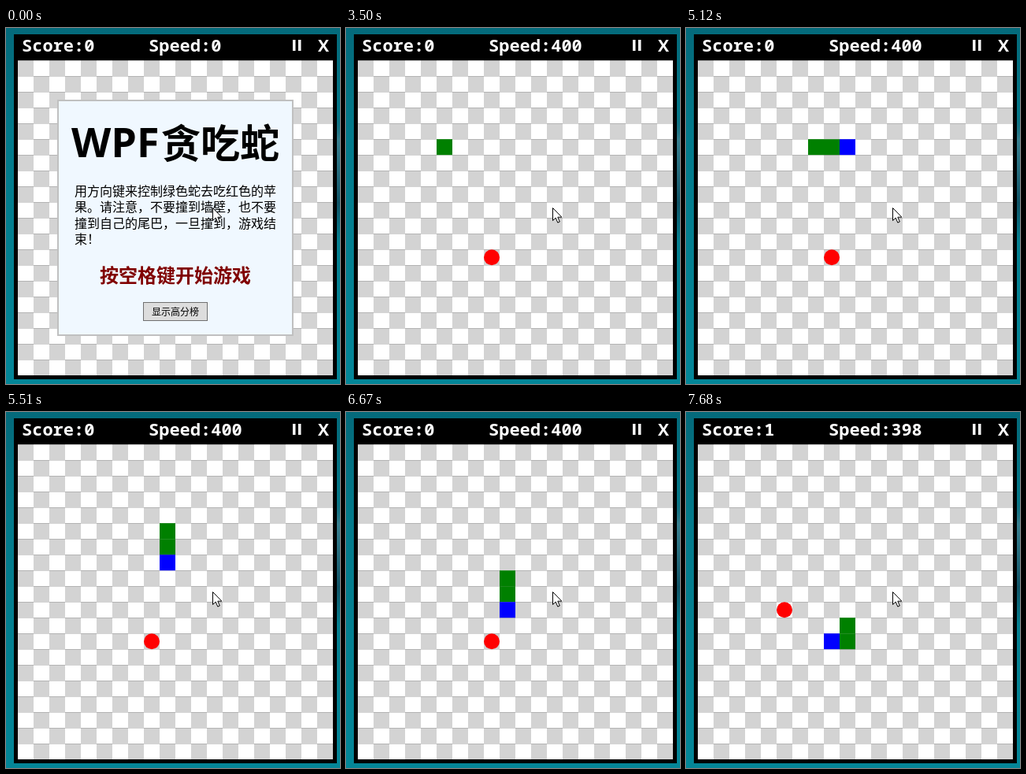
Write an HTML page with a canvas that moves like this. It is 424 by 452 pixels and loops after 8 s.

```html
<!DOCTYPE html>
<html lang="zh-CN">
<head>
<meta charset="utf-8">
<title>贪吃蛇</title>
<style>
html, body { margin: 0; width: 424px; height: 452px; overflow: hidden; }
canvas { display: block; }
</style>
</head>
<body>
<canvas id="stage" width="424" height="452"></canvas>
<script>
const ctx = document.getElementById('stage').getContext('2d');
const LOOP = 8000, CELL = 20, LEFT = 15, TOP = 41.2;
const SCORES_AT = 500, GAME_AT = 3500, EAT_AT = 7680;
const CJK = '"Noto Sans CJK SC", "Noto Sans CJK", sans-serif';
const LATIN = '"Open Sans", "Noto Sans", ' + CJK;
const MONO = '"Noto Sans Mono", "DejaVu Sans Mono", monospace';

const moveTimes = [3500, 3880, 4280, 4660, 5120, 5200, 5510, 5890, 6290, 6670, 7130, 7530, 7680];
const path = moveTimes.map((_, i) => i < 5 ? [5 + i, 5] : i < 12 ? [9, i + 1] : [8, 12]);

const intro = [
  '用方向键来控制绿色蛇去吃红色的苹',
  '果。请注意，不要撞到墙壁，也不要',
  '撞到自己的尾巴，一旦撞到，游戏结',
  '束！'
];
const scores = [['柳禾舟', 123], ['练习7', 80], ['摘果', 12], ['摘果', 11], ['好好好', 10]];

function rect(x, y, w, h, color) {
  ctx.fillStyle = color;
  ctx.fillRect(x, y, w, h);
}

function text(str, x, y, font, color = '#000', align = 'left') {
  ctx.font = font;
  ctx.fillStyle = color;
  ctx.textAlign = align;
  ctx.fillText(str, x, y);
}

function cell([col, row], color) {
  rect(LEFT + col * CELL, TOP + row * CELL, CELL, CELL, color);
}

function drawWater() {
  const g = ctx.createLinearGradient(0, 0, 0, 452);
  g.addColorStop(0, '#046a7b');
  g.addColorStop(0.3, '#047a8b');
  g.addColorStop(0.6, '#047f90');
  g.addColorStop(1, '#048698');
  rect(0, 0, 424, 452, g);
  // soft shade on the right-hand strip
  const s = ctx.createLinearGradient(0, 110, 0, 270);
  s.addColorStop(0, 'rgba(40,70,90,0)');
  s.addColorStop(0.2, 'rgba(90,130,145,.6)');
  s.addColorStop(0.7, 'rgba(20,65,85,.7)');
  s.addColorStop(1, 'rgba(20,65,85,0)');
  rect(420, 110, 4, 160, s);
}

function drawWindow(score, speed) {
  rect(10, 8, 410, 438, '#000');
  const font = 'bold 22px ' + MONO;
  text('Score:' + score, 20, 30, font, '#fff');
  text('Speed:' + speed, 181, 30, font, '#fff');
  rect(364, 15, 3.5, 14, '#fff');
  rect(371, 15, 3.5, 14, '#fff');
  text('X', 403, 30, 'bold 21px ' + LATIN, '#fff', 'center');
}

function drawBoard() {
  ctx.save();
  ctx.beginPath();
  ctx.rect(15, 41, 400, 400);
  ctx.clip();
  for (let row = 0; row < 20; row++)
    for (let col = 0; col < 20; col++)
      cell([col, row], (row + col) % 2 ? '#fff' : '#d3d3d3');
  ctx.restore();
}

function drawPanel() {
  rect(65, 91, 300, 300, '#c0c0c0');
  rect(67, 93, 296, 296, '#f0f8ff');
}

function drawPrompt(y) {
  text('按空格键开始游戏', 215, y, 'bold 24px ' + CJK, '#800000', 'center');
}

function drawWelcome() {
  drawPanel();
  text('WPF', 83, 164, 'bold 52px ' + LATIN);
  text('贪吃蛇', 197, 165, 'bold 50px ' + CJK);
  intro.forEach((line, i) => text(line, 87, 213 + i * 20.3, '16px ' + CJK));
  drawPrompt(323);
  rect(174, 348, 82, 24, '#707070');
  rect(175, 349, 80, 22, '#ddd');
  text('显示高分榜', 215, 365, '12px ' + CJK, '#000', 'center');
}

function drawScores() {
  drawPanel();
  text('高分榜', 215, 139, 'bold 34.6px ' + CJK, '#000', 'center');
  rect(67, 146, 296, 2, '#c0c0c0');
  scores.forEach(([name, points], i) => {
    const y = 187 + i * 37.5;
    text(name, 72, y, '22px ' + LATIN);
    text(points, 358, y, '22px ' + LATIN, '#000', 'right');
  });
  drawPrompt(373);
}

function drawGame(t) {
  const [col, row] = t < EAT_AT ? [8, 12] : [5, 10];
  ctx.fillStyle = '#f00';
  ctx.beginPath();
  ctx.arc(LEFT + col * CELL + 10, TOP + row * CELL + 10, 10, 0, Math.PI * 2);
  ctx.fill();

  const head = moveTimes.filter(m => m <= t).length - 1;
  for (let i = Math.max(0, head - 2); i <= head; i++)
    cell(path[i], i === head && head > 0 ? '#00f' : '#008000');
}

function drawCursor() {
  const outline = [[0, 0], [0, 16], [3.7, 12.6], [6.3, 18.6], [8.8, 17.5], [6.3, 11.7], [11.4, 11.7]];
  ctx.beginPath();
  outline.forEach(([x, y]) => ctx.lineTo(262.5 + x, 228.5 + y));
  ctx.closePath();
  ctx.fillStyle = '#fff';
  ctx.fill();
  ctx.strokeStyle = '#000';
  ctx.lineWidth = 1;
  ctx.stroke();
}

function draw(t) {
  const speed = t < SCORES_AT ? 0 : t < EAT_AT ? 400 : 398;
  drawWater();
  drawWindow(t < EAT_AT ? 0 : 1, speed);
  drawBoard();
  if (t < SCORES_AT) drawWelcome();
  else if (t < GAME_AT) drawScores();
  else drawGame(t);
  if (t < SCORES_AT || t >= GAME_AT) drawCursor();
}

const start = performance.now();
function tick() {
  draw((performance.now() - start) % LOOP);
  requestAnimationFrame(tick);
}
tick();
</script>
</body>
</html>
```
